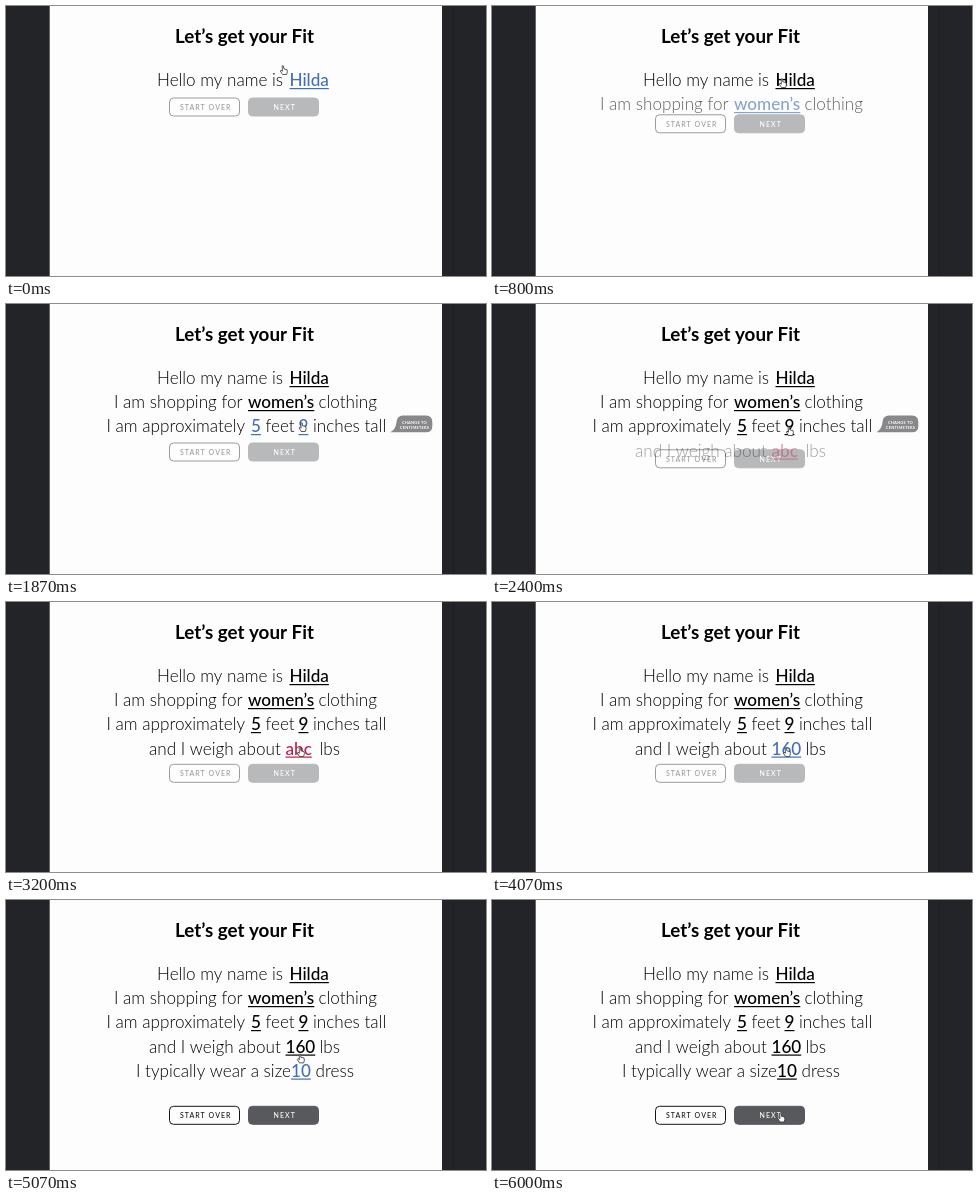
Animation of 480 by 270 pixels, one loop 6140 ms. Source, as an HTML page with a canvas:

```html
<!DOCTYPE html>
<html lang="en">
<head>
<meta charset="utf-8">
<title>Fit form</title>
<style>
html, body { margin: 0; width: 100%; height: 100%; overflow: hidden; background: #fdfdfd; }
canvas { display: block; width: 480px; height: 270px; }
</style>
</head>
<body>
<canvas id="stage" width="480" height="270"></canvas>
<script>
const ctx = document.getElementById('stage').getContext('2d');
const LOOP = 6140;
const BLUE = [66, 112, 180], RED = [190, 32, 72], BLACK = [0, 0, 0];

// Each line: fade-in start, baseline, then [text, x, done time] (a done time marks a field).
const lines = [
  { start: -1000, y: 80, parts: [['Hello my name is', 151], ['Hilda', 283.5, 470]] },
  { start: 490, y: 104, parts: [['I am shopping for', 108], ['women’s', 242, 1290], ['clothing', 312.5]] },
  { start: 1290, y: 128, parts: [['I am approximately', 100.5], ['5', 245, 2160], ['feet', 259.5], ['9', 292.5, 2160], ['inches tall', 307]] },
  { start: 2210, y: 152.5, parts: [['and I weigh about', 143], ['160', 279.5, 4260], ['lbs', 313.5]] },
  { start: 4330, y: 176.5, parts: [['I typically wear a size', 130], ['10', 285, 5700], ['dress', 309.5]] }
];
// Button top after each line has opened.
const buttonTops = [92, 115.5, 139, 162.3, 206.3];
// Pointer moves: from time, to time, x, y.
const moves = [
  [0, 0, 278, 64], [70, 420, 291, 77], [880, 1200, 291, 105], [1620, 1980, 298, 127],
  [2450, 2800, 295, 150], [4900, 5300, 295, 173], [5730, 5980, 289.5, 217.5]
];

const ramp = (t, from, to) => Math.min(1, Math.max(0, (t - from) / (to - from || 1)));
const ease = p => p < .5 ? 2 * p * p : 1 - 2 * (1 - p) ** 2;
const mix = (a, b, p) => a + (b - a) * p;
const rgb = (a, b = a, p = 0) => `rgb(${a.map((v, i) => Math.round(mix(v, b[i], p)))})`;

function text(str, x, y, font, color, align = 'left', spacing = 0) {
  ctx.font = font + ' Lato, sans-serif';
  ctx.letterSpacing = spacing + 'px';
  ctx.textAlign = align;
  ctx.fillStyle = color;
  ctx.fillText(str, x, y);
}

function drawLine({ start, y, parts }, t) {
  ctx.globalAlpha = ramp(t, start, start + 500);
  for (const [str, x, done] of parts) {
    if (!done) { text(str, x, y, '300 17.1px', '#000'); continue; }
    const unset = str === '160' && t < 3660;
    const label = unset ? 'abc' : str;
    const color = rgb(unset ? RED : BLUE, BLACK, ramp(t, done, done + 100));
    text(label, x, y, '500 17.1px', color);
    ctx.fillRect(x, y + 2, ctx.measureText(label).width, 1.2);
  }
  ctx.globalAlpha = 1;
}

function drawBubble(t) {
  ctx.globalAlpha = ramp(t, 1290, 1690) * (1 - ramp(t, 2420, 2740));
  ctx.fillStyle = '#88888a';
  ctx.beginPath();
  ctx.moveTo(384.5, 128.3);
  ctx.quadraticCurveTo(390, 125, 390.5, 118);
  ctx.quadraticCurveTo(391, 111.5, 397, 111.5);
  ctx.lineTo(420, 111.5);
  ctx.quadraticCurveTo(426.3, 111.5, 426.3, 118);
  ctx.lineTo(426.3, 122);
  ctx.quadraticCurveTo(426.3, 128.3, 420, 128.3);
  ctx.fill();
  text('CHANGE TO', 408.5, 119.5, '700 4px', '#fff', 'center', .2);
  text('CENTIMETERS', 408.5, 125, '700 4px', '#fff', 'center', .2);
  ctx.globalAlpha = 1;
}

function button(label, x, y, fill, stroke, color) {
  ctx.beginPath();
  ctx.roundRect(x, y, 70, 18, 4);
  ctx.fillStyle = fill;
  ctx.fill();
  ctx.strokeStyle = stroke;
  ctx.lineWidth = 1;
  ctx.stroke();
  text(label, x + 36.2, y + 11.8, '500 7px', color, 'center', 1.05);
}

function drawButtons(t) {
  let y = buttonTops[0];
  for (let i = 1; i < lines.length; i++) {
    const { start } = lines[i];
    y += (buttonTops[i] - buttonTops[i - 1]) * ease(ramp(t, start, start + 500));
  }
  const on = ramp(t, 4220, 4400);
  const outline = rgb([155, 155, 157], [20, 20, 22], on);
  const fill = rgb([184, 185, 186], [88, 89, 92], on);
  button('START OVER', 163.5, y, '#fdfdfd', outline, outline);
  button('NEXT', 242.5, y, fill, fill, '#fff');
}

function drawPointer(t) {
  let [, , x, y] = moves[0];
  for (const [from, to, nx, ny] of moves) {
    const p = ease(ramp(t, from, to));
    x = mix(x, nx, p);
    y = mix(y, ny, p);
  }
  ctx.save();
  ctx.translate(x, y);
  ctx.beginPath();
  ctx.moveTo(-1.5, 4.5);
  ctx.lineTo(-3.7, 1);
  ctx.lineTo(-3, .2);
  ctx.lineTo(-1.6, 1.2);
  ctx.lineTo(-1.8, -4);
  ctx.quadraticCurveTo(-1, -5, -.4, -4);
  ctx.lineTo(-.2, -1.2);
  ctx.lineTo(3, -.4);
  ctx.quadraticCurveTo(4, 1.5, 2.6, 4.5);
  ctx.closePath();
  ctx.fillStyle = '#fff';
  ctx.fill();
  ctx.strokeStyle = '#333';
  ctx.lineWidth = .8;
  ctx.stroke();
  ctx.restore();
}

function draw(t) {
  ctx.fillStyle = '#fdfdfd';
  ctx.fillRect(0, 0, 480, 270);
  ctx.fillStyle = '#232428';
  ctx.fillRect(0, 0, 43.7, 270);
  ctx.fillRect(436, 0, 44, 270);
  ctx.fillStyle = '#1e1f22';
  ctx.fillRect(447, 0, 1, 270);
  text('Let’s get your Fit', 238.5, 37, '700 18.8px', '#000', 'center');
  drawButtons(t);
  for (const line of lines) drawLine(line, t);
  drawBubble(t);
  drawPointer(t);
}

function tick(now) {
  draw(now % LOOP);
  requestAnimationFrame(tick);
}
requestAnimationFrame(tick);
</script>
</body>
</html>
```
